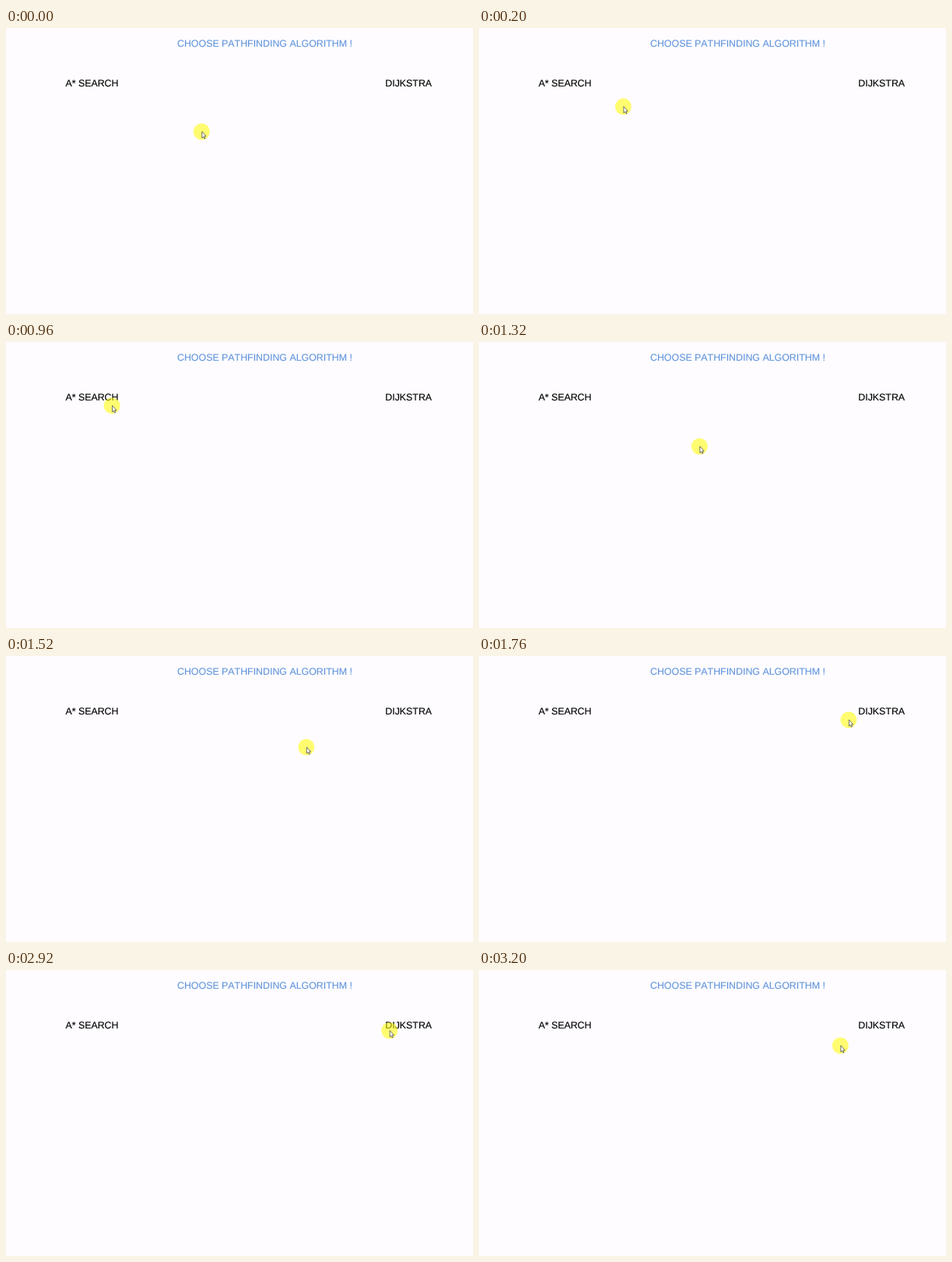
These frames come from a looping animation (600 px wide and 367 px high, 3.24 s). An HTML page:

```html
<!DOCTYPE html>
<html lang="en">
<head>
<meta charset="utf-8">
<title>Choose pathfinding algorithm</title>
<style>
  html, body { margin: 0; width: 100%; height: 100%; overflow: hidden; background: #fefcff; }
  svg { display: block; width: 100vw; height: 100vh; }
  text {
    font: 12.39px "Liberation Sans", Arial, sans-serif;
    font-kerning: none;
    text-rendering: geometricPrecision;
    white-space: pre;
    stroke: currentColor;
    stroke-width: .15px;
    fill: currentColor;
  }
</style>
</head>
<body>
<svg viewBox="0 0 600 367">
  <rect width="600" height="367" fill="#fefcff"/>
  <text x="220" y="24" color="#6496dc" style="color:#6496dc">CHOOSE PATHFINDING ALGORITHM !</text>
  <text id="astar" x="76.4" y="75">A* SEARCH</text>
  <text id="dijkstra" x="487.3" y="75">DIJKSTRA</text>
  <g id="pointer">
    <circle cx=".3" r="10.5" fill="#fffb00" fill-opacity=".56"/>
    <path d="M.8-.1V8.1L2.5 6.5L3.8 9.2L5 8.7L3.8 5.9H6.1Z"
          fill="#fff" stroke="#444" stroke-width=".75" stroke-linejoin="round"/>
  </g>
</svg>
<script>
  const LOOP = 3240, STEP = 40;
  const RED = '#e60f19', BLACK = '#000';

  const easeIn = p => u => u ** p;
  const easeOut = p => u => 1 - (1 - u) ** p;
  const smooth = u => u * u * (3 - 2 * u);

  // The pointer visits both labels, resting on each
  const home = { x: 251, y: 133 };
  const moves = [
    { from: 0, to: 640, x: 126, y: 72, easeX: easeOut(2), easeY: easeOut(2) },
    { from: 840, to: 1320, x: 283, y: 134, easeX: easeIn(2), easeY: smooth },
    { from: 1320, to: 1890, x: 498, y: 74, easeX: easeOut(1.5), easeY: smooth },
    { from: 2800, to: 3200, x: 464, y: 97, easeX: easeIn(1.5), easeY: easeIn(1.5) }
  ];

  const byId = id => document.getElementById(id);
  const astar = byId('astar'), dijkstra = byId('dijkstra'), pointer = byId('pointer');

  function position(t) {
    let { x, y } = home;
    for (const m of moves) {
      const u = Math.min(1, Math.max(0, (t - m.from) / (m.to - m.from)));
      x += (m.x - x) * m.easeX(u);
      y += (m.y - y) * m.easeY(u);
    }
    return { x, y };
  }

  function paint(label, hovered) {
    label.style.color = hovered ? RED : BLACK;
  }

  function draw(time) {
    const { x, y } = position(Math.floor(time % LOOP / STEP) * STEP);
    const onRow = y >= 64 && y <= 77;
    paint(astar, onRow && x >= 76 && x <= 145);
    paint(dijkstra, onRow && x >= 487 && x <= 548);
    pointer.setAttribute('transform', `translate(${x.toFixed(2)} ${y.toFixed(2)})`);
  }

  const start = performance.now();
  function tick() {
    draw(performance.now() - start);
    requestAnimationFrame(tick);
  }
  tick();
</script>
</body>
</html>
```
